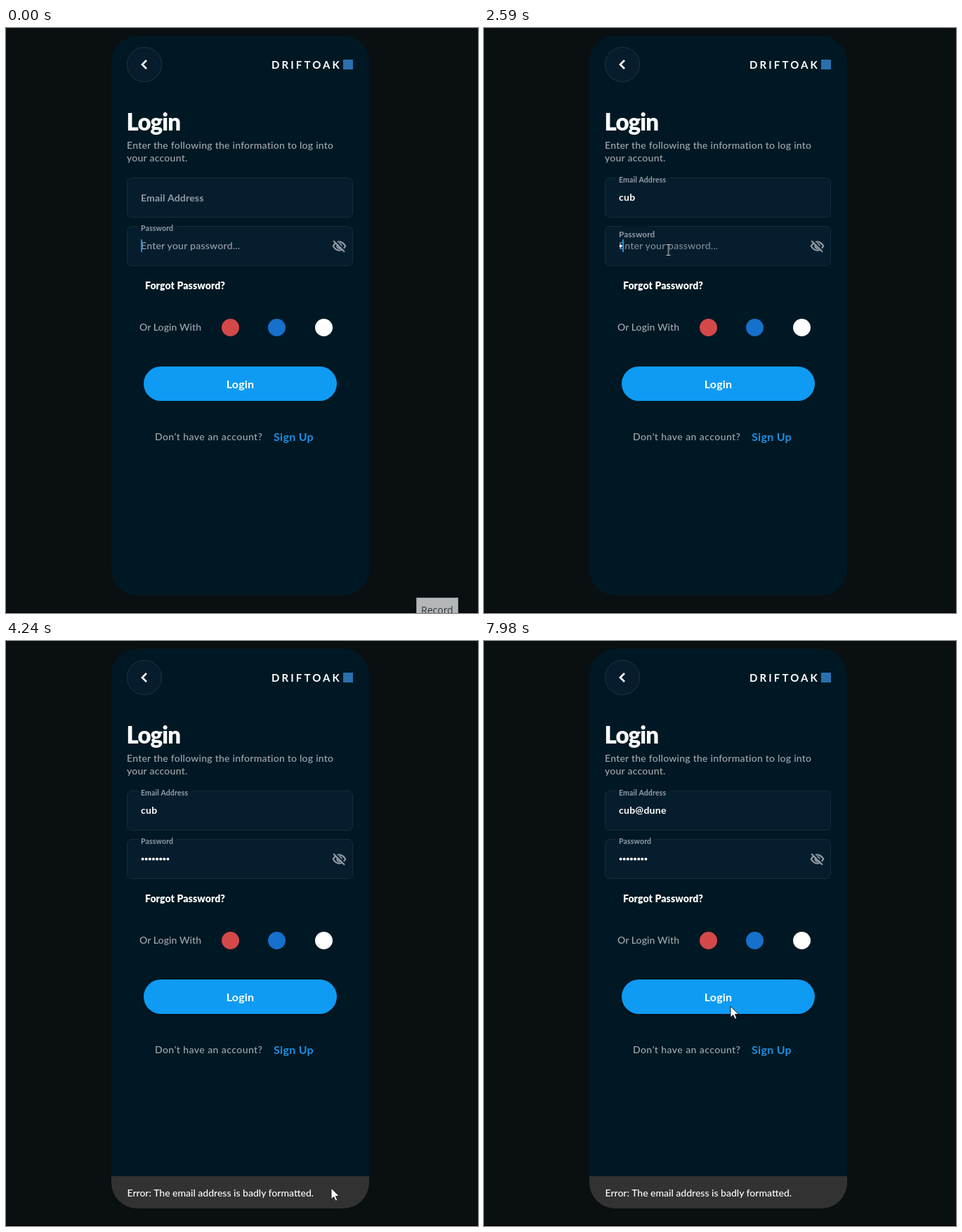
These frames come from a looping animation (672x833 px, 8 s). An HTML page:

```html
<!DOCTYPE html>
<html lang="en">
<head>
<meta charset="utf-8">
<title>Login</title>
<style>
/* One 8 s loop: 1% = 80 ms */
@property --lift { syntax: "<number>"; inherits: true; initial-value: 0; }

html, body { margin: 0; width: 100%; height: 100%; overflow: hidden; background: #0a0f12; }
#stage {
  position: relative; width: 672px; height: 833px; overflow: hidden;
  font: 500 14px/20px Lato, sans-serif; letter-spacing: .25px; color: #a0a9b1;
}
#stage * { box-sizing: border-box; }
#stage div, #stage svg, .label, .hint, .gap, .ripple { position: absolute; white-space: nowrap; }

.floor { left: 0; right: 0; bottom: 0; height: 1px; background: #000; }
.phone {
  left: 149.5px; top: 11px; width: 367.5px; height: 797px;
  border-radius: 37px; background: #001823; overflow: hidden;
}
.back {
  left: 172px; top: 27px; width: 49.5px; height: 49.5px;
  border-radius: 50%; background: #071c2c; border: 1px solid #213543;
}
.brand { left: 378px; top: 42px; font-size: 15px; font-weight: 700; letter-spacing: 3.1px; color: #fff; }
.mark { left: 480px; top: 45px; width: 13.5px; height: 13.5px; background: #2a70ae; }
.title { left: 171.5px; top: 122.5px; font-size: 33px; font-weight: 900; letter-spacing: -.9px; color: #fff; }
.intro { left: 172px; top: 158px; line-height: 18px; }
.forgot { left: 198px; top: 356.5px; font-weight: 900; letter-spacing: .1px; color: #fff; }
.with { left: 190px; top: 416px; letter-spacing: .1px; }
.dot { top: 414px; width: 25px; height: 25px; border-radius: 50%; }
.ask { left: 212px; top: 572px; letter-spacing: .43px; }
.signup { left: 381px; top: 572.4px; font-size: 16px; font-weight: 700; letter-spacing: .3px; color: #1c8fe3; }

.field {
  left: 172px; width: 322px; height: 57px; border-radius: 7px;
  background: #061d2e; border: 1px solid #182c3b;
}
.email { top: 213px; animation: email-lift 8s infinite; }
.pass { top: 282px; animation: pass-lift 8s infinite; }
.label {
  left: 19px; top: 18px; transform-origin: 0 50%; color: #939da5; font-weight: 700; letter-spacing: .2px;
  transform: translateY(calc(-26px * var(--lift))) scale(calc(1 - .25 * var(--lift)));
}
.gap { left: 15px; top: -1px; height: 1px; background: #04192a; transform: scaleX(var(--lift)); }
.email .gap { width: 77px; }
.pass .gap { width: 55px; }
.hint { left: 19px; top: 17px; color: #98a2aa; }
.email .hint { animation: email-hint 8s linear infinite; }
.pass .hint { animation: pass-hint 8s linear infinite; }
#stage .row { left: 19px; top: 17px; height: 20px; display: flex; align-items: center; color: #fff; font-weight: 700; }
.typed::before { content: ""; animation: typing 8s step-end infinite; }
.bullets {
  height: 5px; font-size: 5.14px;
  background: radial-gradient(circle, #fff 1.7px, transparent 2.3px) 0 0 / 1em 5px;
  animation: bullets 8s step-end infinite;
}
.caret { width: 1.7px; height: 18px; background: #2490dc; }
.email .caret { animation: email-caret 8s linear infinite; }
.pass .caret { animation: pass-caret 8s linear infinite; }
.eye { left: 291px; top: 17px; }

.button {
  left: 196px; top: 482px; width: 275px; height: 49px; border-radius: 25px; overflow: hidden;
  background: #0f9bf4; color: #fff; text-align: center;
  font-size: 16px; font-weight: 700; line-height: 49.6px; letter-spacing: .2px;
  animation: hover 8s infinite;
}
.ripple {
  left: 134px; top: 8px; width: 20px; height: 20px; border-radius: 50%; background: #fff;
  animation: ripple 8s linear infinite;
}
.snack {
  left: 0; right: 0; bottom: 0; height: 46px; padding: 13.6px 0 0 23px;
  background: #323232; color: #fff; letter-spacing: 0;
  animation: snack 8s infinite;
}
.tip {
  left: 584px; top: 811px; width: 59.5px; height: 30px; padding: 7px 0 0 6px;
  background: #b4b7b9; border: 1px solid #8b8e90; color: #33373a;
  font: 14px/20px "Open Sans", sans-serif; letter-spacing: 0;
  animation: tip 8s step-end infinite;
}

.pointer { left: 0; top: 0; animation: travel 8s linear infinite; }
.pointer svg { left: 0; top: 0; overflow: visible; width: 1px; height: 1px; }
.arrow { animation: arrow 8s step-end infinite; }
.beam { animation: beam 8s step-end infinite; }
.hand { animation: hand 8s step-end infinite; }

@keyframes email-lift {
  0%, 9.75% { --lift: 0; animation-timing-function: cubic-bezier(.4, 0, .2, 1); }
  11.84%, 100% { --lift: 1; }
}
@keyframes pass-lift {
  0%, 9.75% { --lift: 1; animation-timing-function: cubic-bezier(.4, 0, .2, 1); }
  11.84%, 31.5% { --lift: 0; animation-timing-function: cubic-bezier(.4, 0, .2, 1); }
  33.59%, 100% { --lift: 1; }
}
@keyframes email-hint {
  0%, 9.75% { opacity: 0; }
  11.84%, 15.25% { opacity: 1; }
  17.5%, 100% { opacity: 0; }
}
@keyframes pass-hint {
  0%, 9.75% { opacity: 1; }
  11.84%, 31.5% { opacity: 0; }
  32.37% { opacity: .85; }
  34.6%, 100% { opacity: 0; }
}
@keyframes typing {
  0% { content: ""; }
  15.25% { content: "c"; }
  20.25% { content: "cu"; }
  22.75% { content: "cub"; }
  84.25% { content: "cub@"; }
  86.875% { content: "cub@d"; }
  89.375% { content: "cub@du"; }
  91.875% { content: "cub@dun"; }
  94.5%, 100% { content: "cub@dune"; }
}
@keyframes bullets {
  0% { width: 0; }
  32.37% { width: 1em; }
  33.125% { width: 2em; }
  34% { width: 3em; }
  34.875% { width: 4em; }
  35.75% { width: 5em; }
  36.625% { width: 6em; }
  37.375% { width: 7em; }
  39.125%, 100% { width: 8em; }
}
@keyframes email-caret {
  0%, 9.9% { opacity: 0; }
  10%, 28.5% { opacity: 1; }
  29.5%, 70.8% { opacity: 0; }
  70.9%, 80% { opacity: 1; }
  80.125%, 84.2% { opacity: 0; }
  84.25%, 96.5% { opacity: 1; }
  97.8%, 100% { opacity: 0; }
}
@keyframes pass-caret {
  0%, 9.75% { opacity: 1; }
  9.85%, 31.4% { opacity: 0; }
  31.5%, 45.5% { opacity: 1; }
  46.5%, 53.5% { opacity: 0; }
  54.5%, 59% { opacity: 1; }
  60%, 66% { opacity: 0; }
  67%, 70.7% { opacity: 1; }
  70.8%, 100% { opacity: 0; }
}
@keyframes hover {
  0%, 43.5% { background: #0f9bf4; box-shadow: none; }
  45%, 48.5% { background: #1c9ae8; box-shadow: 0 2px 5px #0006; }
  50.5%, 100% { background: #0f9bf4; box-shadow: 0 2px 4px #0004; }
}
@keyframes ripple {
  0%, 46.75% { transform: scale(.3); opacity: 0; }
  47%, 47.6% { transform: scale(1); opacity: .13; }
  48.6% { transform: scale(3); opacity: .12; }
  50.5%, 100% { transform: scale(9); opacity: 0; }
}
@keyframes snack {
  0%, 48.1% { transform: translateY(46px); animation-timing-function: cubic-bezier(.4, 0, .2, 1); }
  51.2%, 100% { transform: none; }
}
@keyframes tip {
  0% { opacity: 1; }
  1.75%, 100% { opacity: 0; }
}
@keyframes travel {
  0%, .875% { transform: translate(610px, 814px); }
  3.75% { transform: translate(490px, 620px); }
  6.25% { transform: translate(350px, 405px); }
  9.25% { transform: translate(246px, 265px); }
  10.125%, 26.25% { transform: translate(240px, 259px); }
  30.5%, 34% { transform: translate(262.5px, 316px); }
  37.375% { transform: translate(331px, 388px); }
  39.125% { transform: translate(336px, 425px); }
  43.75%, 48.6% { transform: translate(341px, 501px); }
  53%, 53.7% { transform: translate(463px, 779px); }
  59% { transform: translate(516px, 816px); }
  62.5% { transform: translate(597px, 805px); }
  66% { transform: translate(450px, 510px); }
  69.125%, 84.25% { transform: translate(310px, 261.5px); }
  93.625% { transform: translate(317px, 294px); }
  96% { transform: translate(465px, 400px); }
  97.875% { transform: translate(361px, 468px); }
  99.75%, 100% { transform: translate(351px, 520px); }
}
@keyframes arrow {
  0% { opacity: 0; }
  .875% { opacity: 1; }
  9% { opacity: 0; }
  35.5% { opacity: 1; }
  43.2% { opacity: 0; }
  49.5% { opacity: 1; }
  68.8% { opacity: 0; }
  94.5%, 100% { opacity: 1; }
}
@keyframes beam {
  0% { opacity: 0; }
  9% { opacity: 1; }
  35.5% { opacity: 0; }
  68.8% { opacity: 1; }
  94.5%, 100% { opacity: 0; }
}
@keyframes hand {
  0% { opacity: 0; }
  43.2% { opacity: 1; }
  49.5%, 100% { opacity: 0; }
}
</style>
</head>
<body>
<div id="stage">
  <div class="floor"></div>
  <div class="phone">
    <div class="snack">Error: The email address is badly formatted.</div>
  </div>

  <div class="back"></div>
  <svg style="left:190px;top:44px" width="14" height="16" fill="none" stroke="#fff" stroke-width="2.7">
    <path d="M10 2L4 8l6 6"/>
  </svg>
  <div class="brand">DRIFTOAK</div>
  <div class="mark"></div>

  <div class="title">Login</div>
  <div class="intro">Enter the following the information to log into<br>your account.</div>

  <div class="field email">
    <i class="gap"></i>
    <span class="label">Email Address</span>
    <span class="hint">Enter your email...</span>
    <div class="row"><span class="typed"></span><i class="caret"></i></div>
  </div>
  <div class="field pass">
    <i class="gap"></i>
    <span class="label">Password</span>
    <span class="hint">Enter your password...</span>
    <div class="row"><i class="bullets"></i><i class="caret"></i></div>
    <svg class="eye" width="21" height="21" viewBox="0 0 24 24" fill="none" stroke="#929ca4" stroke-width="2.4">
      <path d="M2 12Q6 5 12 5T22 12Q18 19 12 19T2 12Z"/>
      <circle cx="12" cy="12" r="3.6"/>
      <path d="M4 2L22 20" stroke="#061d2e"/>
      <path d="M2.5 3.5l18 18"/>
    </svg>
  </div>

  <div class="forgot">Forgot Password?</div>
  <div class="with">Or Login With</div>
  <div class="dot" style="left:307px;background:#d4484a"></div>
  <div class="dot" style="left:373px;background:#1670cc"></div>
  <div class="dot" style="left:440px;background:#fff"></div>

  <div class="button">Login<i class="ripple"></i></div>
  <div class="ask">Don’t have an account?</div>
  <div class="signup">Sign Up</div>
  <div class="tip">Record</div>

  <div class="pointer">
    <svg class="arrow">
      <path d="M0 0v16l3.7-3.5 2.5 5.8 2.6-1.1-2.4-5.6h5z" fill="#fff" stroke="#111" stroke-width=".9"/>
    </svg>
    <svg class="beam" fill="none">
      <defs><path id="bar" d="M-3-7.5h2.2L0-7 .8-7.5H3M0-7V7M-3 7.5h2.2L0 7l.8.5H3"/></defs>
      <use href="#bar" stroke="#000" stroke-width="2.4"/>
      <use href="#bar" stroke="#dfe3e6" stroke-width="1.1"/>
    </svg>
    <svg class="hand" stroke="#111" stroke-linejoin="round">
      <path d="M-1.5 1.2Q0-1 1.5 1.2V8q1.5-1.6 2.8.3 1.6-1 2.6.7 2.4-.8 2.6 1.5v5q0 2.5-1.5 4V22H-.5v-2L-4.5 14Q-6.5 10.5-4 10.5L-1.5 13z" fill="#fff"/>
      <path d="M1.5 8v4M4.3 8.5V12M6.9 9.2V12"/>
    </svg>
  </div>
</div>
</body>
</html>
```
